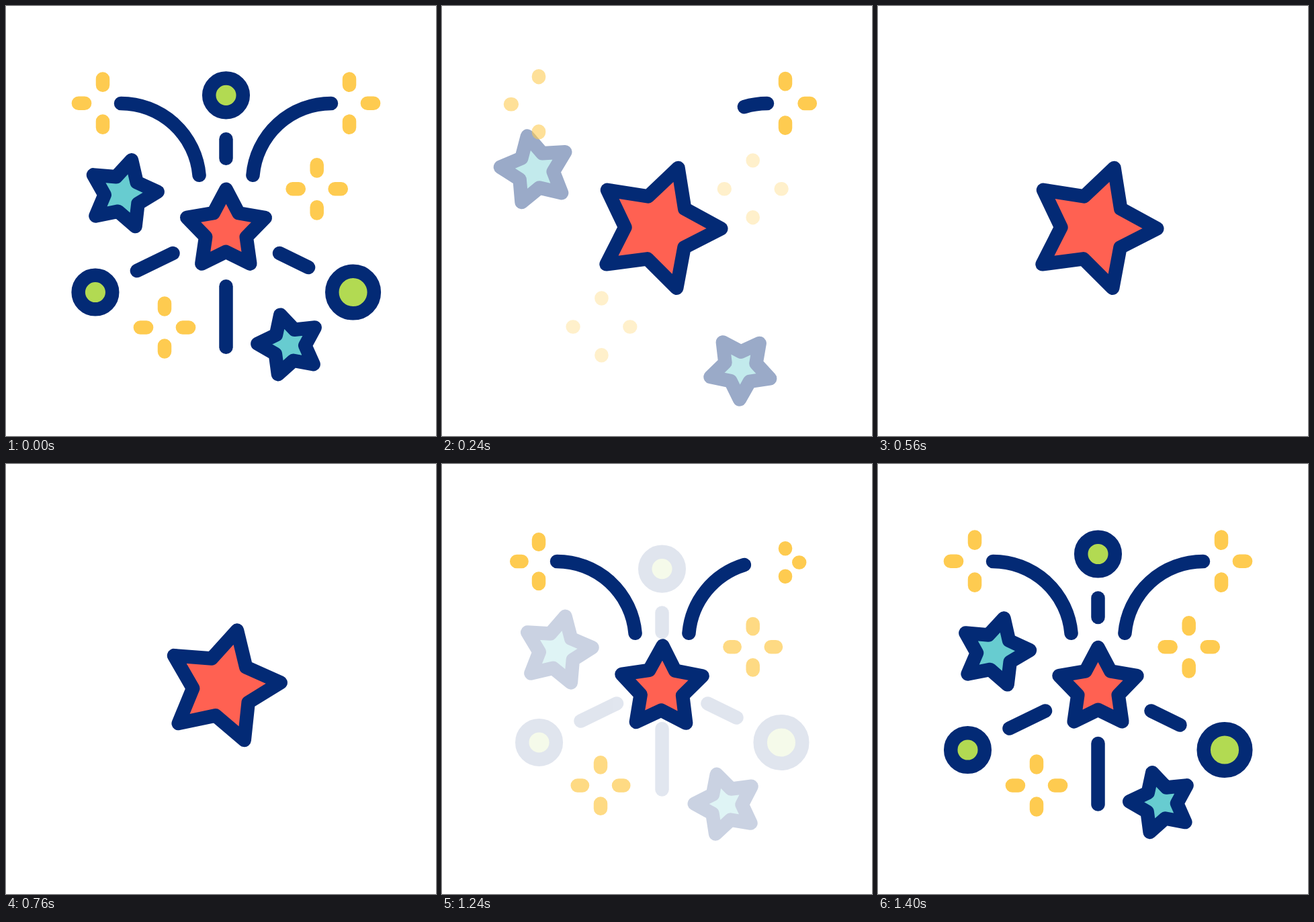
An HTML page for the animation above (1620 ms loop, 640 px wide and 640 px high).

```html
<!DOCTYPE html>
<html lang="en">
<head>
<meta charset="utf-8">
<title>Firework</title>
<style>
  html, body { margin: 0; height: 100%; overflow: hidden; background: #fff; }
  svg { display: block; width: 100vw; height: 100vh; fill: none; stroke: #032a75;
        stroke-width: 20.5; stroke-linecap: round; stroke-linejoin: round; }
</style>
</head>
<body>
<svg id="stage" viewBox="0 0 640 640"></svg>
<script>
const LOOP = 1620, TURN = 700, MID = 327.5;
const RED = '#ff6152', CYAN = '#67ccd0', GREEN = '#b2da52', YELLOW = '#fecb50';
const stage = document.getElementById('stage');

const clamp = u => Math.max(0, Math.min(1, u));
const part = (t, a, b) => clamp((t - a) / (b - a));
const ease = u => (1 - Math.cos(Math.PI * u)) / 2;
const rad = deg => deg * Math.PI / 180;

function add(tag, attrs, parent = stage) {
  const el = document.createElementNS('http://www.w3.org/2000/svg', tag);
  set(el, attrs);
  parent.appendChild(el);
  return el;
}
function set(el, attrs) {
  for (const k in attrs) el.setAttribute(k, attrs[k]);
}

// Shared swing: fast burst outwards, slow return home
const swing = t => t < 400 ? 1 - (1 - t / 400) ** 3 : 1 - ease(part(t, 400, 1400));

function makeStar({ x, y, r, angle, fill, dx, dy, spin, grow = 0, fades = true }) {
  const el = add('polygon', { fill });
  const group = add('g', {});
  group.appendChild(el);
  return t => {
    const p = swing(t), size = r * (1 + grow * p), points = [];
    for (let i = 0; i < 10; i++) {
      const a = rad(angle + spin * p + i * 36), d = size * (i % 2 ? 0.52 : 1);
      points.push([x + dx * p + d * Math.cos(a), y + dy * p + d * Math.sin(a)]);
    }
    set(el, { points: points.join(' ') });
    if (fades) set(group, { opacity: t < TURN ? 1 - part(t, 0, 400) : part(t, 1200, 1400) });
  };
}

// A ray is a bar with an optional ring, shot along (dx, dy)
function makeRay(dx, dy, bar, ring) {
  const g = add('g', {});
  add('path', { d: bar }, g);
  if (ring) add('circle', { cx: ring[0], cy: ring[1], r: ring[2], fill: GREEN }, g);
  return t => {
    const out = t < TURN;
    const u = out ? part(t, 0, 220) : part(t, 1220, 1400);
    const shift = out ? 250 * u : -25 * (1 - u);
    set(g, { transform: `translate(${dx * shift} ${dy * shift})`, opacity: out ? 1 - u : u });
  };
}

function makeArc(mirrored, leave, enter) {
  const el = add('path', {});
  const span = 85, radius = 117;
  const at = deg => {
    const x = 171 + radius * Math.sin(rad(deg));
    return `${mirrored ? 2 * MID - x : x} ${262 - radius * Math.cos(rad(deg))}`;
  };
  return t => {
    const out = t < TURN;
    const e = ease(out ? part(t, leave, leave + 200) : part(t, enter, enter + 200));
    const from = out ? 0 : span * (1 - e), to = out ? span * (1 - e) : span;
    set(el, {
      d: `M${at(from)} A${radius} ${radius} 0 0 ${mirrored ? 0 : 1} ${at(to)}`,
      opacity: out ? +(e < 1) : part(t, enter, enter + 100)
    });
  };
}

const UP = [0, -1], DOWN = [0, 1], LEFT = [-1, 0], RIGHT = [1, 0];
const petals = (x, y, dirs, a, b) =>
  dirs.map(([dx, dy]) => `M${x + dx * a} ${y + dy * a}L${x + dx * b} ${y + dy * b}`).join('');

function makeCornerSparkle(x, y, dirs, leave, enter) {
  const el = add('path', { stroke: YELLOW });
  return t => {
    const out = t < TURN;
    const q = out ? ease(part(t, leave, leave + 200)) : 1 - ease(part(t, enter, enter + 200));
    const r = 31.5 + (out ? 12 : -12) * q, half = 4.6 * (1 - q) + 0.01;
    set(el, {
      d: petals(x, y + 2 * q, dirs, r - half, r + half),
      opacity: out ? clamp((leave + 200 - t) / 100) : +(t > enter)
    });
  };
}

function makeSparkle(x, y, dx, dy) {
  const el = add('path', { stroke: YELLOW });
  const dirs = [UP, RIGHT, DOWN, LEFT];
  return t => {
    let a = 27, b = 36.1, opacity, q = 0;
    if (t < TURN) {
      q = ease(part(t, 0, 300));
      const half = 4.6 * (1 - q) + 0.01, r = 31.5 + 12 * q;
      a = r - half;
      b = r + half;
      opacity = clamp((300 - t) / 200);
    } else {
      opacity = part(t, 1100, 1300);
      b = a + 0.01 + 9.1 * ease(opacity);
    }
    set(el, { d: petals(x + dx * q, y + dy * q, dirs, a, b), opacity });
  };
}

const actors = [
  makeRay(0, -1, `M${MID} 199.5V228`, [MID, 134, 25.3]),
  makeRay(0, 1, `M${MID} 416V506.5`),
  makeRay(-0.5, 0.5, 'M195.5 393.5L249 367.5', [133.5, 425.5, 25.3]),
  makeRay(0.5, 0.5, 'M406.5 367.5L449.5 388.5', [516, 425.5, 31.3]),
  makeArc(false, 0, 1000),
  makeArc(true, 100, 1100),
  makeStar({ x: 174, y: 279.8, r: 52, angle: -3, fill: CYAN, dx: -37.6, dy: -38, spin: -30 }),
  makeStar({ x: 420.8, y: 504.2, r: 46.6, angle: -33.7, fill: CYAN, dx: 25, dy: 37, spin: -20 }),
  makeCornerSparkle(144, 144.7, [UP, LEFT, DOWN], 100, 1100),
  makeCornerSparkle(511, 144.7, [UP, RIGHT, DOWN], 200, 1200),
  makeSparkle(462.7, 272.3, 0, 0),
  makeSparkle(236, 478.5, 1.6, -1.2),
  makeStar({ x: MID, y: 334, r: 61, angle: -90, fill: RED, dx: -6.6, dy: -4.2, spin: 20,
             grow: 0.577, fades: false })
];

const start = performance.now();
function draw() {
  const t = (performance.now() - start) % LOOP;
  actors.forEach(act => act(Math.min(t, 1400)));
  requestAnimationFrame(draw);
}
draw();
</script>
</body>
</html>
```
